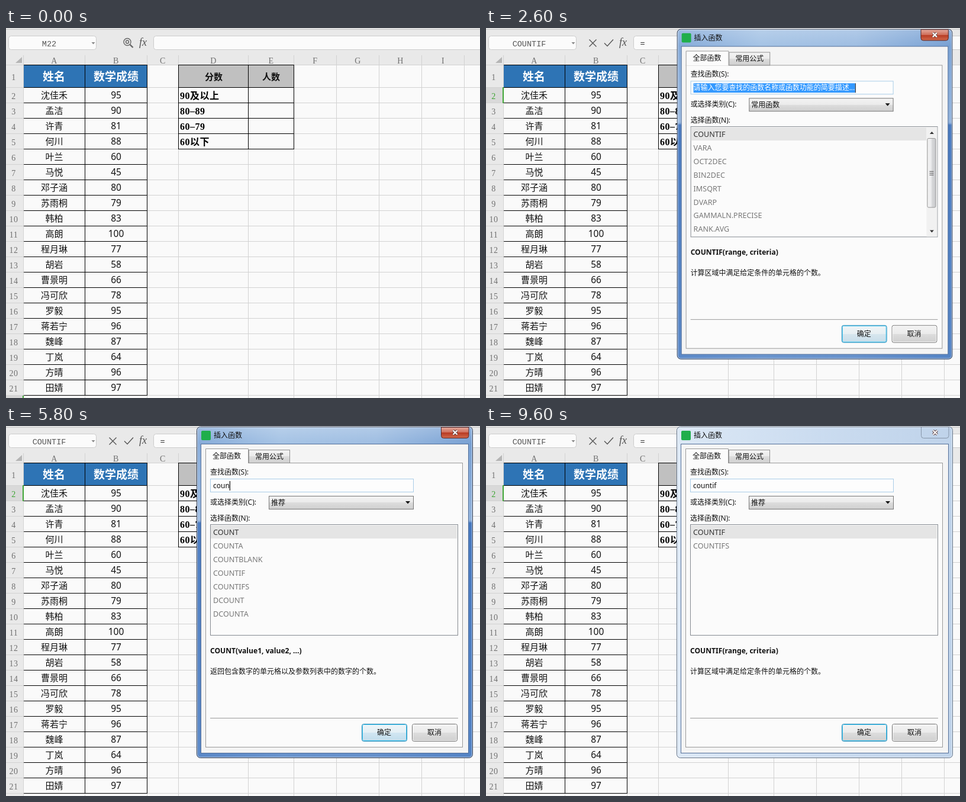
An HTML page that plays this animation: 801x625 px, repeating every 9700 ms.

```html
<!DOCTYPE html>
<html lang="zh-CN">
<head>
<meta charset="utf-8">
<title>插入函数</title>
<style>
  html, body { margin: 0; width: 100%; height: 100%; overflow: hidden; background: #fafafa; }
  svg { display: block; width: 100vw; height: 100vh; }
  text { font-family: "Noto Sans", "Noto Sans CJK SC", sans-serif; white-space: pre; }
  .mono { font-family: "Liberation Mono", "Noto Sans CJK SC", monospace; }
  .serif { font-family: "Liberation Serif", "Noto Sans CJK SC", serif; letter-spacing: .5px; }
  .slant { font-style: italic; letter-spacing: 0; }
</style>
</head>
<body>
<svg viewBox="0 0 801 625" preserveAspectRatio="none">
  <defs id="defs"></defs>
  <g id="sheet"></g>
  <g id="marks"></g>
  <g id="dialog"></g>
</svg>
<script>
const LOOP = 9700;
const GREEN = '#3fa535';
const byId = id => document.getElementById(id);

// Markup helpers
const rect = (x, y, w, h, fill, stroke = 'none', extra = '') =>
  `<rect x="${x}" y="${y}" width="${w}" height="${h}" fill="${fill}" stroke="${stroke}" ${extra}/>`;
const path = (d, stroke, width = 1, fill = 'none', extra = '') =>
  `<path d="${d}" stroke="${stroke}" stroke-width="${width}" fill="${fill}" ${extra}/>`;
const text = (x, y, str, size = 12, fill = '#111', extra = '') =>
  `<text x="${x}" y="${y}" font-size="${size}" fill="${fill}" ${extra}>${str}</text>`;
const mid = (x, y, str, size, fill, extra = '') =>
  text(x, y, str, size, fill, `text-anchor="middle" ${extra}`);
const mono = (x, y, str, fill) => mid(x, y, str, 13.5, fill, 'class="mono"');
const heading = (x, y, str, fill = '#707070') => mid(x, y, str, 14, fill, 'class="serif"');
const grad = (id, stops, across = false) =>
  `<linearGradient id="${id}" x1="0" y1="0" x2="${+across}" y2="${+!across}">` +
  stops.map(([o, c]) => `<stop offset="${o}" stop-color="${c}"/>`).join('') + '</linearGradient>';

byId('defs').innerHTML =
  grad('glass', [[0, '#7ea5d6'], [.3, '#9fbfe3'], [.65, '#98b9e0'], [1, '#6f9ad0']], true) +
  grad('shine', [[0, '#ffffff40'], [.05, '#ffffff10'], [.28, '#ffffff40'], [.29, '#2f64b4a0'], [1, '#3f72bc90']]) +
  grad('pale', [[0, '#dce8f5'], [.5, '#cbdcf0'], [1, '#bfd3ea']], true) +
  grad('red', [[0, '#e3aa9e'], [.48, '#cf6d59'], [.5, '#b83a22'], [1, '#d0694c']]) +
  grad('button', [[0, '#f3f3f3'], [.49, '#ebebeb'], [.5, '#dddddd'], [1, '#cfcfcf']]) +
  grad('hot', [[0, '#eaf6fd'], [.49, '#d9f0fc'], [.5, '#bee6fd'], [1, '#a7d9f5']]) +
  grad('soft', [[0, '#f0f4f6'], [.49, '#e8eff2'], [.5, '#d9e6ed'], [1, '#cbdee8']]) +
  grad('thumb', [[0, '#f5f5f5'], [.49, '#e9e9eb'], [.5, '#d9dadc'], [1, '#c8c9cc']], true);

// Worksheet
const COLS = [29, 133, 238, 291, 409, 486, 558, 630, 702, 774];
const NAMES = '沈佳禾 孟洁 许青 何川 叶兰 马悦 邓子涵 苏雨桐 韩柏 高朗 程月琳 胡岩 曹景明 冯可欣 罗毅 蒋若宁 魏峰 丁岚 方晴 田婧'.split(' ');
const SCORES = [95, 90, 81, 88, 60, 45, 80, 79, 83, 100, 77, 58, 66, 78, 95, 96, 87, 64, 96, 97];
const BANDS = ['90及以上', '80–89', '60–79', '60以下'];
const rowTop = r => r === 1 ? 62 : 100 + 26 * (r - 2);

function drawSheet() {
  let s = rect(0, 0, 801, 625, '#fafafa') + rect(0, 0, 801, 62, '#e9e9e9') +
    rect(0, 62, 29, 563, '#e9e9e9') + rect(0, 1.5, 801, 1.5, '#cdcdcd');
  s += rect(4.5, 13.5, 148, 23, '#fbfbfb', '#cccccc', 'rx="4"') +
    rect(249.5, 13.5, 570, 23, '#fbfbfb', '#cccccc', 'rx="4"');
  s += path('M144.5 24h6l-3 3.5z', 'none', 0, '#888') +
    text(225, 30, 'fx', 18, '#555', 'class="serif slant"');
  s += path('M27 49v10h-11z', 'none', 0, '#b5b5b5');

  let grid = 'M0 62.5H801';
  for (let r = 2; r <= 22; r++) grid += `M0 ${rowTop(r) + .5}H801`;
  for (const x of COLS) grid += `M${x + .5} 46V625`;
  s += path(grid, '#d2d2d2');
  for (let c = 0; c < 9; c++) s += heading((COLS[c] + COLS[c + 1]) / 2 + .5, 60, 'ABCDEFGHI'[c]);
  for (let r = 1; r <= 21; r++) s += heading(13, r === 1 ? 88 : rowTop(r) + 20, r);

  s += rect(30, 62.5, 208.5, 38, '#2e74b5') + rect(291.5, 62.5, 195, 38, '#c0c0c0');
  s += mid(81, 89, '姓名', 19, '#fff', 'font-weight="700"') +
    mid(186, 89, '数学成绩', 19, '#fff', 'font-weight="700"') +
    mid(351, 87.5, '分数', 15, '#111', 'font-weight="700"') +
    mid(448, 87.5, '人数', 15, '#111', 'font-weight="700"');

  let ink = 'M30 62.5H238.5M291.5 62.5H486.5';
  for (const x of [133, 238]) ink += `M${x + .5} 62V621`;
  for (const x of [291, 409, 486]) ink += `M${x + .5} 62V205`;
  for (let r = 2; r <= 22; r++) ink += `M30 ${rowTop(r) + .5}H239`;
  for (let r = 2; r <= 6; r++) ink += `M291 ${rowTop(r) + .5}H487`;
  s += path(ink, '#000');

  NAMES.forEach((name, i) => {
    const y = rowTop(i + 2) + 19;
    s += mid(81.5, y, name, 15, '#111') + mid(186, y, SCORES[i], 15.5, '#111');
  });
  BANDS.forEach((band, i) => {
    s += text(294, rowTop(i + 2) + 20, band, 16, '#000', 'class="serif" font-weight="700"');
  });
  byId('sheet').innerHTML = s;
}

// Selection, name box and formula bar
function drawMarks(t) {
  const chosen = t >= 1000, editing = t >= 2300;
  let s = mono(73, 31, editing ? 'COUNTIF' : chosen ? 'E2' : 'M22', '#555');
  if (editing) {
    s += path('M174.5 19.5l12 12M186.5 19.5l-12 12', '#555', 1.4) +
      path('M200 25.5l5 5L215 19.5', '#555', 1.4) + mono(264.5, 30, '=', '#222');
  } else {
    s += '<g fill="none" stroke="#666" stroke-width="1.4"><circle cx="205" cy="23.5" r="6"/>' +
      '<circle cx="205" cy="23.5" r="2.5"/><path d="M209.5 28l5 5" stroke-width="2.4"/></g>';
  }
  if (!chosen) {
    s += rect(0, 621, 29, 4, '#d6d6d6') + rect(28, 621, 2, 4, GREEN);
  } else {
    s += rect(0, 101, 29, 25, '#d9d9d9') + rect(28, 100, 2, 27, GREEN) + heading(13, 120, 2, GREEN);
    s += rect(410, 45, 76, 17, '#d3d3d3') + rect(409, 61, 78, 2, GREEN) + heading(448, 60, 'E', GREEN);
    if (!editing) {
      s += rect(409, 100, 78, 27, 'none', GREEN, 'stroke-width="2"') +
        rect(484, 124, 6, 6, '#fafafa') + rect(485, 125, 4, 4, GREEN);
    }
  }
  if (t >= 1700) s += mono(447.5, 119, '=', '#111');
  byId('marks').innerHTML = s;
}

// Search results
const COUNTIF_HELP = ['COUNTIF(range, criteria)', '计算区域中满足给定条件的单元格的个数。'];
const LISTS = [
  { at: 0, kind: '常用函数', thumb: 118, help: COUNTIF_HELP,
    items: 'COUNTIF VARA OCT2DEC BIN2DEC IMSQRT DVARP GAMMALN.PRECISE RANK.AVG' },
  { at: 4100, kind: '推荐', thumb: 24,
    help: ['ACCRINT(issue, first_interest, settlement, rate, par, basis)', '返回定期付息有价证券的应计利息。'],
    items: 'ACCRINT ACCRINTM ACOS ACOSH AMORDEGRC AMORLINC BIN2DEC BIN2OCT' },
  { at: 4500, kind: '推荐', thumb: 40,
    help: ['ACOS(number)', '求给定数值的反余弦，以弧度返回，幅度值范围是 0 到 PI'],
    items: 'ACOS ACOSH CODE COLUMN COLUMNS COMBIN COMPLEX CONCAT' },
  { at: 5300, kind: '推荐', thumb: 0,
    help: ['COUNT(value1, value2, ...)', '返回包含数字的单元格以及参数列表中的数字的个数。'],
    items: 'COUNT COUNTA COUNTBLANK COUNTIF COUNTIFS DCOUNT DCOUNTA' },
  { at: 6500, kind: '推荐', thumb: 0, help: COUNTIF_HELP, items: 'COUNTIF COUNTIFS' }
];
const CLEARED = 3300;
const KEYS = [4100, 4500, 5300, 5600, 6200, 6500, 7000];
const WORD = 'countif';
const TYPED_WIDTH = [0, 5.8, 13, 20.4, 27.8, 32.2, 35.3, 39.4];

function searchField(t) {
  let s = rect(345.5, 89.5, 343, 22, '#fdfdfd', '#a9cde8');
  if (t < CLEARED) {
    return s + rect(350, 93, 274, 16, '#3399ff') +
      text(350, 105, '请输入您要查找的函数名称或函数功能的简要描述...', 12, '#fff') +
      rect(624, 93, 1, 16, '#111');
  }
  const n = KEYS.filter(k => k <= t).length;
  s += text(350, 105, WORD.slice(0, n));
  const since = t - (n ? KEYS[n - 1] : CLEARED);
  if (t < 7500 && since % 1060 < 530) s += rect(350 + TYPED_WIDTH[n], 93, 1.2, 16, '#111');
  return s;
}

function resultList(list) {
  let s = rect(345.5, 166.5, 418, 187, '#fbfbfb', '#858a91') +
    rect(346, 168, list.thumb ? 399 : 416, 22, '#e5e5e5');
  list.items.split(' ').forEach((item, i) => {
    s += text(350, 184 + 23 * i, item, 12.6, i ? '#777' : '#333');
  });
  if (list.thumb) {
    const c = 186 + list.thumb / 2;
    s += rect(745, 167, 18, 186, '#f1f1f1') +
      path('M750.5 179h7l-3.5-4zM750.5 342h7l-3.5 4z', 'none', 0, '#333') +
      rect(746.5, 186.5, 14, list.thumb - 1, 'url(#thumb)', '#979797', 'rx="2"') +
      path(`M750 ${c - 2.5}h7m-7 3h7m-7 3h7`, '#555');
  }
  return s;
}

function pushButton(x, label, border, glow, fills) {
  return fills.map(([id, o]) => rect(x + .5, 503.5, 76, 29, `url(#${id})`, 'none', `rx="3" opacity="${o}"`)).join('') +
    rect(x + .5, 503.5, 76, 29, 'none', border, 'rx="3"') +
    rect(x + 1.5, 504.5, 74, 27, 'none', glow, 'rx="2"') +
    mid(x + 38, 522, label, 12, '#111');
}

function drawDialog(t) {
  const box = byId('dialog');
  if (t < 2300) { box.innerHTML = ''; return; }
  const step = Math.min(4, Math.floor((t - 2300) / 100));
  const scale = [.94, .977, .99, .997, 1][step];
  box.setAttribute('opacity', [.5, .9, .98, 1, 1][step]);
  box.setAttribute('transform', `translate(556 185) scale(${scale} ${1.2 * scale - .2}) translate(-556 -185)`);

  const off = Math.max(0, Math.min(1, (t - 9100) / 300));
  const list = LISTS.filter(l => l.at <= t).pop();

  // Window frame
  const frame = (fill, stroke, extra = '') => rect(322.5, 1.5, 466, 559, fill, stroke, `rx="6" ${extra}`);
  let s = frame('url(#glass)', 'none') + frame('url(#shine)', 'none') +
    frame('url(#pale)', 'none', `opacity="${off}"`) +
    frame('none', off > .5 ? '#5d6f86' : '#26354f') +
    rect(323.5, 2.5, 464, 557, 'none', '#ffffff90', 'rx="5"');
  s += rect(330, 8, 16, 16, '#1fae4b', 'none', 'rx="2"') + text(351, 20, '插入函数');
  const closeEdge = 'M735.5 2V16.5q0 4 4 4H778q4 0 4-4V2';
  s += path(closeEdge + 'z', '#5a2a2a', 1, 'url(#red)', `opacity="${1 - off}"`) +
    path(closeEdge, '#8796a9', 1, 'none', `opacity="${off}"`);
  const cross = 'M755.5 7.5l7 7m0-7l-7 7';
  s += path(cross, '#5b3b3b', 4) + path(cross, '#fff', 2.2);

  // Tabs and panel
  s += rect(329.5, 30.5, 452, 522, '#f4f4f4', '#54709a') +
    rect(337.5, 62.5, 434, 480, '#fbfbfb', '#9a9a9a') +
    rect(410.5, 40.5, 69, 22, 'url(#button)', '#919191') +
    path('M337.5 63V38.5H409.5V63', '#9a9a9a', 1, '#fbfbfb') +
    text(349, 55, '全部函数') + text(421, 56, '常用公式');

  // Search and category
  s += text(345, 82, '查找函数(S):') + searchField(t) + text(345, 133, '或选择类别(C):') +
    rect(444.5, 118.5, 244, 22, 'url(#button)', '#777') + text(448, 134, list.kind) +
    path('M675 127h8l-4 4.5z', 'none', 0, '#111') + text(345, 160, '选择函数(N):');

  // Results and help
  s += resultList(list) + text(345, 384, list.help[0], 12.1, '#111', 'font-weight="700"') +
    text(345, 419, list.help[1]) + path('M345 493.5H764', '#9a9a9a');

  const pulse = .5 - .5 * Math.cos(2 * Math.PI * (t - 2700) / 1100);
  s += pushButton(601, '确定', '#2c88b4', '#48c8f0', [['soft', 1], ['hot', pulse], ['button', off]]) +
    pushButton(686, '取消', '#707070', '#f8f8f8', [['button', 1]]);
  box.innerHTML = s;
}

let shown = -1;
function update(now) {
  const t = Math.floor(now % LOOP / 100) * 100;
  if (t !== shown) {
    shown = t;
    drawMarks(t);
    drawDialog(t);
  }
}

drawSheet();
const start = performance.now();
function tick() {
  update(performance.now() - start);
  requestAnimationFrame(tick);
}
tick();
</script>
</body>
</html>
```
